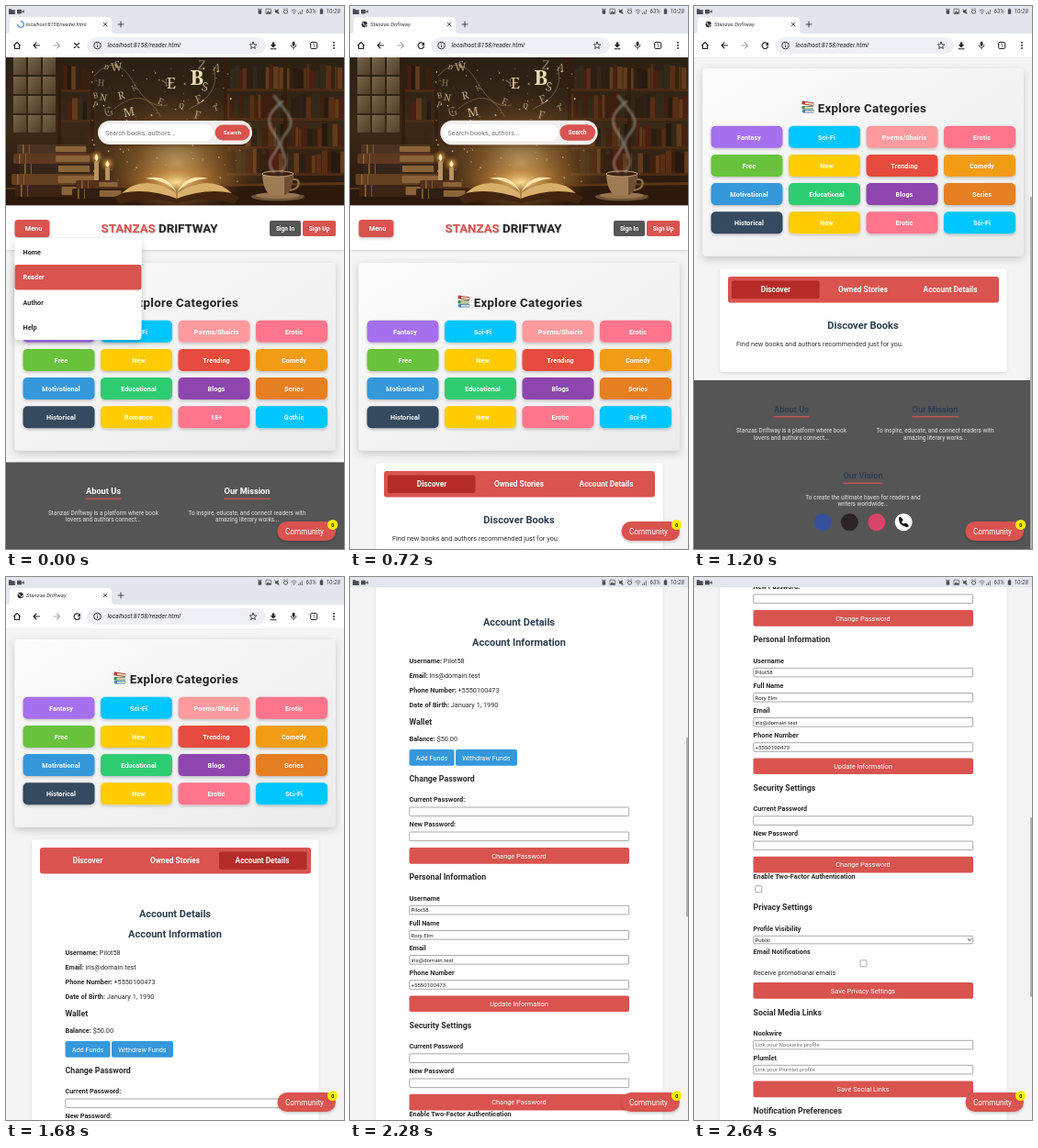
These frames come from a looping animation (368x592 px, 2760 ms). An HTML page:

```html
<!DOCTYPE html>
<html lang="en">
<head>
<meta charset="utf-8">
<title>Stanzas Driftway</title>
<style>
html,body{margin:0;width:100%;height:100%;overflow:hidden;background:#f4f4f4}
svg{display:block;width:100%;height:100%}
text{font-family:Roboto,sans-serif;white-space:pre}
</style>
</head>
<body>
<svg id="stage" viewBox="0 0 368 592" preserveAspectRatio="none"></svg>
<script>
const RED = '#d9534f', NAVY = '#2c3e50', INK = '#2b2b2b';
const SITE = 'Stanzas Driftway', URL_TEXT = 'localhost:8158/reader.html';

// ---- drawing helpers: text is placed by the middle of its capitals ----
const rect = (x, y, w, h, fill, r = 0, more = '') =>
  `<rect x="${x}" y="${y}" width="${w}" height="${h}" rx="${r}" fill="${fill}" ${more}/>`;
const circle = (x, y, r, fill, more = '') =>
  `<circle cx="${x}" cy="${y}" r="${r}" fill="${fill}" ${more}/>`;
const oval = (x, y, rx, ry, fill, more = '') =>
  `<ellipse cx="${x}" cy="${y}" rx="${rx}" ry="${ry}" fill="${fill}" ${more}/>`;
const path = (d, fill, more = '') => `<path d="${d}" fill="${fill}" ${more}/>`;
const line = (d, color, w = 1, more = '') =>
  path(d, 'none', `stroke="${color}" stroke-width="${w}" stroke-linecap="round" stroke-linejoin="round" ${more}`);
const text = (x, y, str, size, fill, more = '') =>
  `<text x="${x}" y="${y + size * 0.355}" font-size="${size}" fill="${fill}" ${more}>${str}</text>`;
const BOLD = 'font-weight="700"', MID = 'text-anchor="middle"', BM = BOLD + ' ' + MID;
const group = (id, body, more = '') => `<g id="${id}" ${more}>${body}</g>`;
const soft = 'filter="url(#soft)"', wide = 'filter="url(#wide)"', faint = 'filter="url(#faint)"';

let seed = 7;
const rnd = () => (seed = (seed * 16807) % 2147483647) / 2147483647;
const between = (a, b) => a + rnd() * (b - a);
const pick = list => list[Math.floor(rnd() * list.length)];

const defs = `<defs>
<filter id="soft" x="-20%" y="-30%" width="140%" height="180%"><feDropShadow dx="0" dy="1.5" stdDeviation="1.5" flood-opacity=".22"/></filter>
<filter id="wide" x="-10%" y="-10%" width="120%" height="125%"><feDropShadow dx="0" dy="3" stdDeviation="4" flood-opacity=".2"/></filter>
<filter id="faint" x="-5%" y="-5%" width="110%" height="110%"><feDropShadow dx="0" dy="1" stdDeviation="1.5" flood-opacity=".14"/></filter>
<filter id="blur"><feGaussianBlur stdDeviation="1.2"/></filter>
<linearGradient id="card" x1="0" y1="0" x2="1" y2="1"><stop offset="0" stop-color="#fcfcfc"/><stop offset="1" stop-color="#ebebeb"/></linearGradient>
<linearGradient id="wall" x1="0" y1="0" x2="0" y2="1"><stop offset="0" stop-color="#30261a"/><stop offset=".5" stop-color="#44311d"/><stop offset="1" stop-color="#28170c"/></linearGradient>
<linearGradient id="pane" x1="0" y1="0" x2="1" y2="1"><stop offset="0" stop-color="#8f805f"/><stop offset="1" stop-color="#5d4c31"/></linearGradient>
<radialGradient id="glow"><stop offset="0" stop-color="#ffdf96"/><stop offset=".4" stop-color="#c98a3c" stop-opacity=".6"/><stop offset="1" stop-color="#8a5524" stop-opacity="0"/></radialGradient>
<clipPath id="frame"><rect x="0" y="56" width="368" height="161.5"/></clipPath>
</defs>`;

// ---- hero ----
function shelf(x, end, base, tall) {
  let out = rect(x, base, end - x, 3, '#5a3518');
  while (x < end - 4) {
    const w = between(3, 7), h = tall * between(0.7, 1);
    out += rect(x, base - h, w - 0.6, h, pick(['#4a2412', '#6a381a', '#33241a', '#5c2516', '#774922', '#2c1e15', '#3b3220']));
    x += w;
  }
  return out;
}

function pile(x, y, w, h, fill) {
  return rect(x, y, w, h, fill, 2) + rect(x + w * 0.55, y + 2, w * 0.44, h - 4, '#8a6438', 1) +
    rect(x + 6, y, 1.6, h, '#8d6330') + rect(x + 13, y, 0.8, h, '#8d6330');
}

function hero() {
  const serif = `style="font-family:'Noto Serif',serif"`;
  let out = rect(0, 56, 368, 162, 'url(#wall)');
  // window
  for (let x = 8; x < 56; x += 16)
    for (let y = 56; y < 140; y += 21) out += rect(x, y, 14, 19, 'url(#pane)');
  out += shelf(60, 92, 91, 28) + shelf(60, 92, 124, 26);
  for (const b of [90, 122, 153, 182]) out += shelf(240, 368, b, 27);
  for (const x of [56, 92, 237, 302]) out += rect(x, 56, 4, 126, '#3a2210');
  out += rect(0, 56, 368, 162, '#1a0d04', 0, 'opacity=".22"');
  out += oval(186, 172, 112, 78, 'url(#glow)', 'opacity=".7"');
  // letters rising from the book
  for (const c of 'EBRAQSTGMCKNEFWYHDPZ') {
    const x = between(88, 240), y = between(63, 120);
    out += text(x, y, c, between(7, 14), '#e6d2a2', `${serif} opacity="${between(0.4, 0.85)}" transform="rotate(${between(-25, 25)} ${x} ${y})"`);
  }
  out += text(208, 78, 'B', 22, '#ecdcb4', `${BOLD} ${MID} ${serif}`) + text(180, 84, 'E', 16, '#e6d2a2', `${MID} ${serif}`);
  out += line('M96 76Q120 50 138 82T176 108M118 112Q150 85 168 120M200 112Q235 96 226 66', '#d8b67a', 0.8, 'opacity=".45"');
  for (let i = 0; i < 130; i++)
    out += circle(between(92, 255), between(66, 214), between(0.3, 1), '#ffe2a0', `opacity="${between(0.3, 0.9)}"`);
  // table and book piles
  out += path('M0 198L368 192V218H0z', '#2c190c') + path('M0 198L368 192V195L0 200z', '#5c3517');
  out += pile(12, 151, 76, 10, '#4a3322') + pile(8, 161, 84, 11, '#5e3820') + pile(14, 172, 78, 11, '#34261b') +
    pile(6, 183, 92, 12, '#63401f') + pile(10, 195, 92, 13, '#3b2415');
  out += pile(76, 190, 46, 9, '#55301c') + pile(72, 199, 54, 11, '#2f1e12');
  for (const [x, y] of [[96, 169], [108, 176]])
    out += circle(x + 2.5, y - 4, 9, 'url(#glow)') + rect(x, y, 5, 190 - y, '#b8935c', 1) +
      path(`M${x + 2.5} ${y - 8}q3.5 5 0 8q-3.5 -3 0 -8z`, '#fff0b5');
  // open book
  out += oval(186, 192, 72, 32, 'url(#glow)');
  out += path('M118 208Q150 194 186 206Q222 194 254 208L248 216Q218 207 186 215Q154 207 124 216z', '#43250f');
  out += path('M126 204Q150 182 186 204Q222 182 246 204Q218 198 186 210Q154 198 126 204z', '#d9b06a');
  out += path('M186 204Q176 182 152 188Q176 190 186 204Q196 182 220 188Q196 190 186 204z', '#ffe6ab');
  out += line('M186 204V210', '#8d5c24', 1);
  // cup and steam
  out += oval(296, 208, 29, 4.6, '#6f5237') + oval(296, 206.6, 24, 3.4, '#97744d');
  out += line('M311 189q10 -1 7 7q-3 5 -10 4.500', '#94724c', 2.4);
  out += path('M279 183H313Q312 203 303 206H289Q280 203 279 183z', '#a07c54') +
    path('M303 183H313Q312 203 303 206z', '#6d4f33') +
    oval(296, 183, 17, 3, '#3c2110', 'stroke="#c2a077" stroke-width="1"');
  out += line('M292 181C276 165 306 158 294 142S284 118 301 104M300 181C314 164 290 156 304 140S306 118 292 98', '#c3c3bd', 2.4, 'opacity=".5" filter="url(#blur)"');
  return `<g clip-path="url(#frame)">${out}</g>`;
}

const search = group('search',
  rect(100, 125, 168, 26, '#f1efed', 13, soft) + rect(103, 129, 123, 18, '#fff', 9) +
  text(108, 138, 'Search books, authors...', 7.2, '#777') +
  rect(227.5, 129.5, 38, 17, RED, 8.5) + text(246.5, 138, 'Search', 6.2, '#fff', BM));

// ---- page parts ----
function nav() {
  const [a, b] = SITE.toUpperCase().split(' ');
  return rect(0, 217.5, 368, 48.5, '#fff', 0, faint) +
    rect(9.5, 233, 38, 19, RED, 3.5, soft) + text(30, 242.8, 'Menu', 7.3, '#fff', BM) +
    text(167, 242.5, `<tspan fill="${RED}">${a}</tspan> ${b}`, 13.3, '#222', BM + ' style="text-shadow:.6px .8px 1px rgba(0,0,0,.2)"') +
    rect(287, 234, 34, 17, '#555', 2) + text(304, 242.5, 'Sign In', 6.5, '#fff', BM) +
    rect(323, 234, 36, 17, RED, 2) + text(341, 242.5, 'Sign Up', 6.5, '#fff', BM);
}

const books = rect(118, 325, 12.5, 3.6, '#3f7fc4', 1) + rect(121, 325.8, 9.5, 2, '#e2d9c4') +
  rect(117.5, 320.9, 12.5, 3.6, '#3f8a46', 1) + rect(120.5, 321.7, 9.5, 2, '#e2d9c4') +
  `<g transform="rotate(9 124 318)">${rect(117.5, 316.4, 13, 3.8, '#b33a31', 1)}${rect(121, 317.3, 9.5, 2, '#e2d9c4')}</g>`;

const COLORS = ['#a570ee', '#00c6ff', '#ff9a9e', '#ff758c', '#67c23a', '#ffcc00', '#e74c3c', '#f39c12',
  '#3498db', '#2ecc71', '#8e44ad', '#e67e22', '#34495e', '#ffcc00', '#ff758c', '#00c6ff'];
const LABELS = ['Fantasy', 'Sci-Fi', 'Poems/Shairis', 'Erotic', 'Free', 'New', 'Trending', 'Comedy',
  'Motivational', 'Educational', 'Blogs', 'Series', 'Historical'];
const cellX = i => 18.5 + (i % 4) * 84.5, cellY = i => 342.7 + Math.floor(i / 4) * 31.2;
const label = (s, i) => text(cellX(i) + 41.5, cellY(i) + 12.3, s, 7.2, '#fff', BM + ' letter-spacing=".08"');

const categories = rect(9.5, 280, 349.5, 204.5, 'url(#card)', 4, wide) + books +
  text(134.7, 323, 'Explore Categories', 13.3, '#222', BOLD + ' letter-spacing=".3"') +
  COLORS.map((c, i) => rect(cellX(i), cellY(i), 78, 24, c, 5, soft)).join('') + LABELS.map(label).join('');
const lastRow = names => names.map((s, i) => label(s, 13 + i)).join('');

function footer(y, head) {
  const block = (x, dy, title, half, rows) =>
    text(x, y + dy, title, 9.2, head, BM) + rect(x - half, y + dy + 7.6, half * 2, 1.2, RED) +
    rows.map((r, i) => text(x, y + dy + 23.3 + i * 7.7, r, 6.4, '#e4e4e4', MID)).join('');
  return rect(0, y, 368, 184, '#555') +
    block(106, 31.6, 'About Us', 19.5, [SITE + ' is a platform where book', 'lovers and authors connect...']) +
    block(262.5, 31.6, 'Our Mission', 25, ['To inspire, educate, and connect readers with', 'amazing literary works...']) +
    block(184, 104, 'Our Vision', 21.5, ['To create the ultimate haven for readers and', 'writers worldwide...']) +
    ['#34519a', '#2a2428', '#d8456a', '#fff'].map((c, i) => circle(140 + i * 29.4, y + 154.7, 9.5, c)).join('') +
    line(`M224.2 ${y + 150.8}q0 7.6 8 8`, '#111', 2.2) +
    line(`M224.4 ${y + 150.6}l1.6 1.8M230.2 ${y + 157.2}l2 1.5`, '#111', 3);
}

const menu = rect(9.5, 253, 138, 111, '#fff', 4, wide) + rect(9.5, 282, 138, 27.5, RED, 3) +
  ['Home', 'Reader', 'Author', 'Help'].map((s, i) =>
    text(18.5, 268.3 + i * 27.4, s, 7.3, i === 1 ? '#fff' : INK, BOLD)).join('');

function panel(active, h) {
  return rect(28, 498.5, 312.5, h, '#fff', 3, faint) + rect(37, 507, 295, 28.5, RED, 3) +
    rect(41 + active * 95.5, 511.5, 95.5, 19.5, '#b52b27', 2) +
    ['Discover', 'Owned Stories', 'Account Details'].map((s, i) =>
      text(89 + i * 95, 521.3, s, 8.3, '#fff', BM)).join('');
}

const discover = panel(0, 112.5) + text(184, 560.3, 'Discover Books', 11.1, NAVY, BM) +
  text(46, 580.5, 'Find new books and authors recommended just for you.', 7.37, '#333') + footer(620, NAVY);

function account() {
  const head = (y, s) => text(64.5, y, s, 8.8, INK, BOLD);
  const name = (y, s) => text(64.5, y, s, 7.3, INK, BOLD);
  const fact = (y, k, v) => text(64.5, y, `<tspan ${BOLD}>${k}:</tspan> ${v}`, 7.3, INK);
  const box = (x, y, w, h) => rect(x, y, w, h, '#fff', 0.8, 'stroke="#858585" stroke-width=".7"');
  const field = (y, s, value = '', color = '#222') =>
    name(y, s) + box(64.8, y + 8.3, 238.9, 9.6) + text(66.5, y + 13.2, value, 6.1, color);
  const wideBtn = (y, s) => rect(64.5, y, 239.5, 17.7, RED, 2) + text(184, y + 9, s, 7.4, '#fff', MID);
  const blueBtn = (x, w, s) => rect(x, 718, w, 17.7, '#3498db', 2) + text(x + w / 2, 727, s, 7.3, '#fff', MID);
  const user = 'Pilot58', mail = 'iris@domain.test', phone = '+5550100473', hint = '#777';
  return panel(2, 1200) +
    text(184, 579, 'Account Details', 11, NAVY, BM) + text(184, 601.5, 'Account Information', 11, NAVY, BM) +
    fact(621.5, 'Username', user) + fact(637.5, 'Email', mail) + fact(653.3, 'Phone Number', phone) +
    fact(669.5, 'Date of Birth', 'January 1, 1990') +
    head(688, 'Wallet') + fact(706, 'Balance', '$50.00') +
    blueBtn(64.5, 49, 'Add Funds') + blueBtn(115, 67, 'Withdraw Funds') +
    head(750, 'Change Password') + field(772.7, 'Current Password:') + field(799.7, 'New Password:') +
    wideBtn(825, 'Change Password') +
    head(857.3, 'Personal Information') + field(880, 'Username', user) + field(907.2, 'Full Name', 'Rory Elm') +
    field(934.2, 'Email', mail) + field(961.4, 'Phone Number', phone) + wideBtn(986.4, 'Update Information') +
    head(1018.8, 'Security Settings') + field(1041.5, 'Current Password') + field(1068.7, 'New Password') +
    wideBtn(1093.7, 'Change Password') +
    name(1115.8, 'Enable Two-Factor Authentication') + box(66.8, 1125.8, 7, 7) +
    head(1149, 'Privacy Settings') + name(1172, 'Profile Visibility') + box(64.8, 1180.3, 238.9, 8.5) +
    text(66.5, 1184.6, 'Public', 6.1, '#222') + line('M298.4 1183.7l1.7 1.7l1.7 -1.7', '#222', 0.9) +
    name(1197.5, 'Email Notifications') + box(181, 1206.8, 7, 7) +
    text(64.5, 1220.3, 'Receive promotional emails', 7.3, INK) + wideBtn(1231, 'Save Privacy Settings') +
    head(1263.5, 'Social Media Links') + field(1286, 'Nookwire', 'Link your Nookwire profile', hint) +
    field(1313, 'Plumlet', 'Link your Plumlet profile', hint) + wideBtn(1338.5, 'Save Social Links') +
    head(1370.7, 'Notification Preferences');
}

// ---- browser frame ----
const K = '#222', G = '#4a4d52', FRAME = '#e3e6ed';
const toolbar = rect(0, 11, 368, 45, '#fff') + rect(0, 11, 368, 19, FRAME) +
  path('M1 30Q4 30 4 26V16Q4 12 8 12H111Q115 12 115 16V26Q115 30 118 30z', '#fff') +
  line('M106.2 18l3.8 3.8M110 18l-3.8 3.8M125 17v6M122 20h6', '#333', 0.9) +
  group('busy', line('M16 16.8A3.2 3.2 0 1 1 12.8 20', '#2f7de1', 1.1, 'id="spin"') +
    text(22, 20, URL_TEXT, 5.6, '#333', 'font-style="italic"') + line('M74.5 40.5l5 5M79.5 40.5l-5 5', K, 1.1)) +
  group('ready', circle(15.7, 20, 3.2, '#333') + line('M13.6 18.6q2 0 1.8 1.8M16.6 22q.3 -2 1.8 -2', '#fff', 0.9) +
    text(22, 20, SITE, 6, '#333', 'font-style="italic"') +
    line('M80 41.2A3.3 3.3 0 1 0 80.6 44', K, 1.1) + path('M81 39.6v3.4h-3.4z', K)) +
  rect(88, 34, 195, 18, '#eef0f6', 9) +
  line('M8.6 42.8L12 39.5L15.4 42.8M9.5 42.4V46.5H14.5V42.4', K, 1.1) +
  line('M36.5 43H30M33 40L30 43L33 46', K, 1.1) + line('M52 43H58.5M55.5 40L58.5 43L55.5 46', '#aaa', 1.1) +
  circle(99.5, 43, 3.8, 'none', `stroke="${K}" stroke-width=".9"`) + line('M99.5 42.8v2M99.5 41v.1', K, 0.9) +
  text(110.5, 43, URL_TEXT, 6.8, K, 'font-style="italic"') +
  line('M269 39.3l1.1 2.5l2.7 .2l-2.1 1.8l.7 2.7l-2.4 -1.5l-2.4 1.5l.7 -2.7l-2.1 -1.8l2.7 -.2z', K, 0.8) +
  path('M289.7 39.5h2.6v2.8h2l-3.3 3.2l-3.3 -3.2h2z', K) + line('M288 46.7h6', K, 1.1) +
  rect(311.7, 38.8, 2.8, 5, K, 1.4) + line('M310.2 42.5q0 2.8 2.9 2.8t2.9 -2.8M313.1 45.3v1.7', K, 0.8) +
  rect(331.7, 39.5, 7, 7, 'none', 1.2, `stroke="${K}" stroke-width="1"`) + text(335.2, 43, '1', 4.8, K, MID) +
  [40, 43, 46].map(y => circle(357, y, 0.9, K)).join('');

const status = rect(0, 0, 368, 11, FRAME) +
  path('M3 3.2h2.6l1 1h3.2v4.8h-6.8z', G) + rect(12, 3.7, 5, 4.8, G, 1) + path('M17 6l2.6 -1.8v3.8z', G) +
  rect(274.6, 4.3, 3.6, 4.4, G, 0.7) + line('M274.4 3.4h4', G, 0.7) +
  rect(282.8, 3.2, 5.8, 5.4, 'none', 0.6, `stroke="${G}" stroke-width=".7"`) + path('M283.2 8.2l2 -3l1.300 1.800l1 -1l1 2.2z', G) +
  path('M293 4.8h1.5l2 -1.8v6l-2 -1.8h-1.5z', G) + line('M292.6 3.2l5 5.600', G, 0.6) +
  circle(304.5, 6.2, 2.1, 'none', `stroke="${G}" stroke-width=".9"`) + line('M302.2 3.5l1 -.7M306.8 3.5l-1 -.7', G, 0.7) +
  line('M310.8 5q2.700 -2.4 5.4 0M311.9 6.6q1.600 -1.4 3.2 0', G, 0.7) + circle(313.5, 8.2, 0.6, G) +
  line('M318.5 8.7v-1M320.4 8.7v-2.6M322.3 8.7v-4.4', G, 0.8) + text(326.5, 6, '63%', 6.3, G, 'font-style="italic"') +
  rect(341.8, 3.4, 3.4, 5.4, G, 0.6) + rect(342.7, 2.6, 1.6, 1, G) +
  text(348.5, 6, '10:28', 6.4, G, 'font-style="italic"');

const community = rect(295.5, 562, 63.5, 21, RED, 10.5, soft) + text(325, 572.7, 'Community', 8.2, '#fff', MID) +
  circle(355.6, 565.5, 5.6, '#ffee00') + text(355.6, 565.6, '0', 5.8, '#222', BM);

const stage = document.getElementById('stage');
stage.innerHTML = defs + rect(0, 0, 368, 592, '#f4f4f4') +
  group('page', hero() + search + nav() + categories +
    group('home', lastRow(['Romance', '18+', 'Gothic']) + footer(497.4, '#fff') + menu) +
    group('reader', lastRow(['New', 'Erotic', 'Sci-Fi']) + group('discover', discover) + group('account', account()))) +
  rect(366, 0, 2, 10, '#b0b0b0', 1, 'id="thumb"') + community + group('bar', toolbar) + status;

// ---- motion ----
const LOOP = 2760, STEP = 120, SWAP = 240, LOADED = 360, OPEN = 1560;
const SCROLL = [[720, 0], [960, 88], [1200, 212], [2040, 212], [2280, 485], [2640, 744]];
const BAR = [[2040, 0], [2100, 45]];
const $ = id => document.getElementById(id);
const show = (id, on) => $(id).setAttribute('display', on ? 'inline' : 'none');
const move = (id, value) => $(id).setAttribute('transform', value);

function along(keys, t) {
  if (t <= keys[0][0]) return keys[0][1];
  for (let i = 1; i < keys.length; i++) {
    const [a, u] = keys[i - 1], [b, v] = keys[i];
    if (t <= b) return u + (v - u) * (t - a) / (b - a);
  }
  return keys[keys.length - 1][1];
}

function draw(now) {
  const t = Math.floor((now % LOOP) / STEP) * STEP;
  const s = along(SCROLL, t), up = along(BAR, t);
  const swapped = t >= SWAP, open = t >= OPEN;
  show('home', !swapped);
  show('reader', swapped);
  show('discover', !open);
  show('account', open);
  show('busy', t < LOADED);
  show('ready', t >= LOADED);
  move('spin', `rotate(${t * 0.6} 16 20)`);
  move('search', `translate(184 138) scale(${swapped ? 1.02 : 1}) translate(-184 -138)`);
  move('page', `translate(0 ${-s - up})`);
  move('bar', `translate(0 ${-up})`);

  const top = 56 - up, view = 592 - top, full = open ? 1722 : 748;
  show('thumb', (t > 720 && t <= 1320) || t > 2040);
  $('thumb').setAttribute('y', top + s * view / full);
  $('thumb').setAttribute('height', view * view / full);
}

const start = performance.now();
function tick() {
  draw(performance.now() - start);
  requestAnimationFrame(tick);
}
tick();
</script>
</body>
</html>
```
